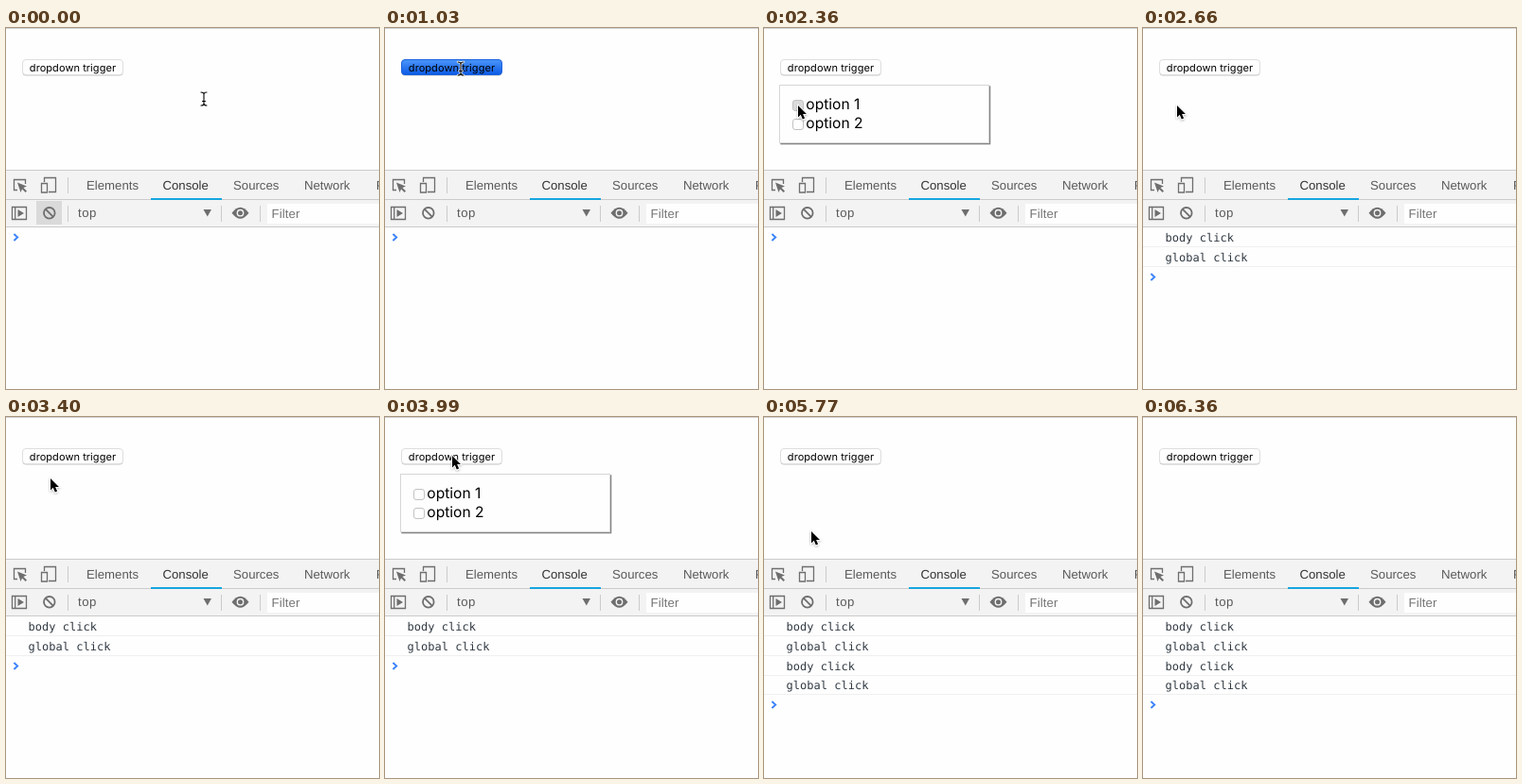
Animation of 394x382 px, one loop 6960 ms. Source, as an HTML page:

```html
<!DOCTYPE html>
<html lang="en">
<head>
<meta charset="utf-8">
<style>
  html, body { margin: 0; width: 100%; height: 100%; overflow: hidden; background: #fefefe; }
  svg { display: block; text-rendering: geometricPrecision; }
  .ui { font: 13.2px "Liberation Sans", Arial, sans-serif; fill: #5a5a5a; }
  .ui .active { fill: #333; }
  .page { font: 15.6px Inter, sans-serif; }
  .button { font: 11px Inter, sans-serif; letter-spacing: .06px; text-anchor: middle; }
  .log { font: 12px "DejaVu Sans Mono", monospace; letter-spacing: .03px; fill: #303942; }
  .icon { fill: none; stroke: #6e6e6e; stroke-width: 1.3; }
  .solid { fill: #6e6e6e; }
</style>
</head>
<body>
<svg width="394" height="382" viewBox="0 0 394 382">
  <defs>
    <linearGradient id="blue" x2="0" y2="1">
      <stop stop-color="#4b96fb"/><stop offset="1" stop-color="#0b59e4"/>
    </linearGradient>
    <filter id="shadow" x="-5%" y="-10%" width="112%" height="125%">
      <feDropShadow dx="1.3" dy="1.3" stdDeviation=".6" flood-color="#777" flood-opacity=".9"/>
    </filter>
    <filter id="soft" x="-50%" y="-50%" width="200%" height="200%">
      <feDropShadow dx="0" dy="1" stdDeviation=".8" flood-opacity=".3"/>
    </filter>
  </defs>
  <rect width="394" height="382" fill="#fefefe"/>
  <rect width="394" height="1" fill="#d2d2d2"/>

  <!-- Page -->
  <rect x="17.5" y="34.3" width="106" height="16.2" rx="3.5" fill="#c4c4c4"/>
  <rect id="button" x="17.5" y="33.5" width="106" height="16" rx="3.5"/>
  <text class="button" x="70.5" y="46">dropdown trigger</text>
  <g id="menu">
    <rect x="16.5" y="60.5" width="221" height="61" fill="#fefefe" stroke="#d6d6d6" filter="url(#shadow)"/>
    <g stroke="#c2c2c2">
      <rect id="box1" x="30.5" y="76.5" width="11" height="11" rx="2.5"/>
      <rect id="box2" x="30.5" y="96.5" width="11" height="11" rx="2.5"/>
    </g>
    <text class="page" x="44.3" y="86">option 1</text>
    <text class="page" x="44.3" y="106">option 2</text>
  </g>

  <!-- Developer tools -->
  <rect y="150" width="394" height="61" fill="#f3f3f3"/>
  <path d="M0 150.5H394M0 181.5H394M0 210.5H394" stroke="#cbcbcb"/>
  <path d="M65.5 158V175M65.5 188V205M227.5 188V205M268.5 188V205" stroke="#cbcbcb"/>
  <rect x="153" y="180" width="75" height="2" fill="#16a5de"/>
  <g class="ui">
    <text x="85" y="171">Elements</text>
    <text class="active" x="165.5" y="171">Console</text>
    <text x="240" y="171">Sources</text>
    <text x="315" y="171">Network</text>
    <text x="391" y="171">Performance</text>
    <text x="76" y="200" letter-spacing=".5">top</text>
  </g>
  <rect x="276" y="186" width="118" height="21" fill="#fefefe"/>
  <text class="ui" x="280.5" y="201" letter-spacing=".1" style="fill:#757575">Filter</text>
  <rect id="hover" x="32" y="183" width="27" height="25" fill="#dadada"/>
  <path class="icon" d="M20.5 165V160.5H8.5V171.5H12"/>
  <path class="solid" d="M12 163.5L22 167.5L18.4 169L22 172.6L20.6 174L17 170.4L15.5 174Z"/>
  <path class="icon" d="M40.5 163V158.5H52.5V173.5H45M37.5 164.5H43.5V174H37.5Z"/>
  <path class="icon" d="M6.5 189.5H21.5V202.5H6.5ZM9.7 190V202"/>
  <path class="solid" d="M12.5 192L19 196L12.5 200Z"/>
  <g class="icon" style="stroke-width:1.8"><circle cx="45.8" cy="195.8" r="5.8"/><path d="M41.7 191.7L49.9 199.9"/></g>
  <path class="solid" d="M208.5 192H217L212.8 199.5Z"/>
  <path class="solid" d="M238.5 195.7Q247.5 183.7 256.5 195.7Q247.5 207.7 238.5 195.7Z"/>
  <circle cx="247.5" cy="195.7" r="3.2" fill="none" stroke="#f3f3f3" stroke-width="1.4"/>
  <g id="logs"></g>
  <path id="prompt" d="M8.4 218L12.2 221.5L8.4 225" fill="none" stroke="#3a82fa" stroke-width="1.9"/>

  <!-- Pointers -->
  <g id="beam" fill="none" stroke-linecap="round">
    <use href="#beamLine" stroke="#fff" stroke-width="2.4"/>
    <use href="#beamLine" stroke="#000" stroke-width="1.1"/>
  </g>
  <defs>
    <path id="beamLine" d="M-3 -7Q0 -7 0 -5Q0 -7 3 -7M0 -5V5M-3 7Q0 7 0 5Q0 7 3 7M-1.5 2.5H1.5"/>
  </defs>
  <path id="arrow" d="M0 0V12.4L2.8 9.8L4.8 14.6L7.1 13.6L5.1 9H9Z" stroke="#fff" stroke-width="1.6" paint-order="stroke" filter="url(#soft)"/>
</svg>
<script>
const LOOP = 6960;
const $ = id => document.getElementById(id);

// [start time, x, y, pointer]
const path = [
  [0, 209, 75, 'beam'], [300, 200, 68, 'beam'], [450, 170, 50, 'beam'], [600, 130, 37, 'beam'],
  [740, 97, 38, 'beam'], [890, 80, 43, 'beam'],
  [1620, 64, 75, 'beam'], [1770, 48, 80, 'beam'], [1910, 38, 82, 'arrow'], [2060, 36, 82, 'arrow'],
  [3110, 37, 79, 'arrow'], [3260, 47, 65, 'arrow'], [3410, 61, 49, 'arrow'], [3550, 69, 42, 'arrow'],
  [3700, 71, 41, 'arrow'],
  [4140, 68, 48, 'arrow'], [4290, 58, 69, 'arrow'], [4430, 45, 90, 'arrow'], [4580, 37, 101, 'arrow'],
  [4730, 35, 102.5, 'arrow'],
  [5770, 50, 121, 'arrow'], [5920, 128, 202, 'arrow'], [6070, 238, 302, 'arrow'],
  [6210, 299, 350, 'arrow'], [6360, 0, 0, 'none']
];

const logTimes = [2660, 5320];
const rowY = row => Math.round(row * 20.8);

$('logs').innerHTML = [0, 1, 2, 3].map(row => `<g>
  <text class="log" x="23.5" y="${226 + rowY(row)}">${row % 2 ? 'global' : 'body'} click</text>
  <path d="M0 ${231.5 + rowY(row)}H394" stroke="#f0f0f0"/></g>`).join('');
const rows = [...$('logs').children];

const show = (node, on) => node.setAttribute('visibility', on ? 'visible' : 'hidden');
const fill = (id, color) => $(id).setAttribute('fill', color);

function draw(t) {
  const within = (from, to) => t >= from && t < to;
  const [, x, y, pointer] = path.filter(step => step[0] <= t).pop();
  for (const id of ['beam', 'arrow']) {
    show($(id), id === pointer);
    $(id).setAttribute('transform', `translate(${x} ${y})`);
  }

  const pressed = within(1030, 1180);
  fill('button', pressed ? 'url(#blue)' : '#fefefe');
  $('button').setAttribute('stroke', pressed ? '#1c62dc' : '#dedede');
  show($('hover'), t < 300);
  const open = within(1180, 2660) || within(3990, 5320);
  $('menu').style.display = open ? '' : 'none';
  fill('box1', within(2360, 2660) ? '#dcdcdc' : '#fefefe');
  fill('box2', within(5020, 5320) ? '#dcdcdc' : '#fefefe');

  const count = 2 * logTimes.filter(time => t >= time).length;
  rows.forEach((row, i) => show(row, i < count));
  $('prompt').setAttribute('transform', `translate(0 ${rowY(count)})`);
}

const start = performance.now();
function tick() {
  draw((performance.now() - start) % LOOP);
  requestAnimationFrame(tick);
}
draw(0);
requestAnimationFrame(tick);
</script>
</body>
</html>
```
